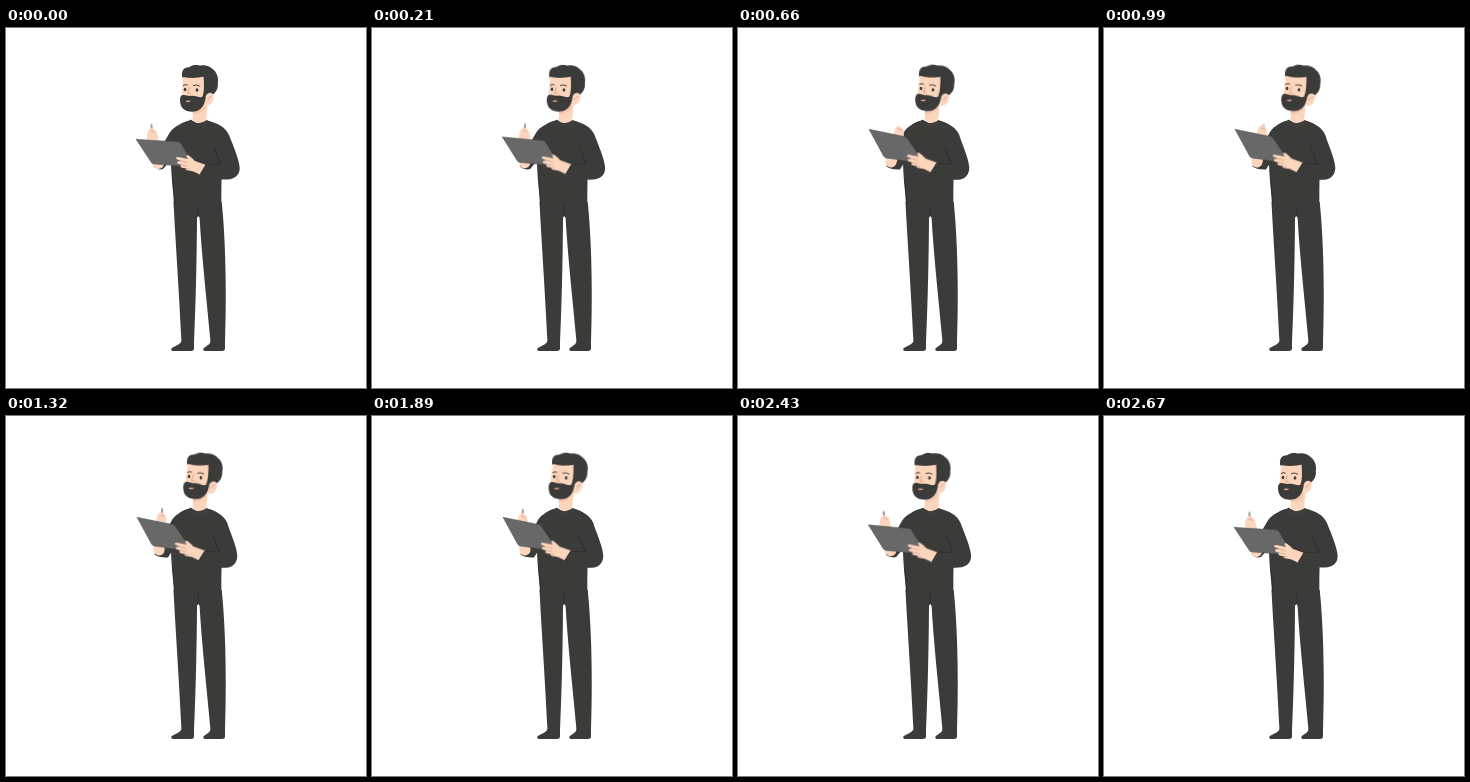
An HTML page that plays this animation: 360x360 px, repeating every 2700 ms.

```html
<!DOCTYPE html>
<html lang="en">
<head>
<meta charset="utf-8">
<title>Man taking notes</title>
<style>
html, body { margin: 0; width: 100%; height: 100%; overflow: hidden; background: #fff; }
svg { display: block; width: 100%; height: 100%; }
.dark { fill: #3b3b3a; }
.skin { fill: #fcd5bd; }
.line { fill: none; stroke: #292929; stroke-width: .7; stroke-linecap: round; }
.thin { fill: none; stroke: #c99279; stroke-width: .6; stroke-linecap: round; }

/* Each moving part eases from pose a to pose b and back. */
.morph { d: var(--a); animation: morph 2.7s ease-in-out infinite; }
@keyframes morph {
  0%, 100% { d: var(--a); }
  23%, 71% { d: var(--b); }
}
.board {
  --a: path("M130 111.3 L172 114 Q174 114 175 116 L187 136.5 Q187 138.5 184 138.5 L148 136 Q146 136 145 134 Z");
  --b: path("M131 101.3 L166.5 108.5 Q168.5 109 169.5 111 L184 132.5 Q184 134.5 181 134.5 L148 130 Q146.5 129.5 145.5 128 Z");
  fill: #686868; stroke: #585858; stroke-width: .5;
}
.far {
  --a: path("M186 92 C176 95 168 98 163.5 105 C158 114 150 129 147.5 138 Q151 142.5 157 141 L174 122 Z");
  --b: path("M186 92 C177 95 170 97.5 166 104 C162 112 151 131 148.5 138.5 Q153 142 162 141.5 L174 122 Z");
}
.near {
  --a: path("M200 92.5 C212 95 219.5 99 223 107 C226.500 116 233.5 132 233.7 140 C233.700 147 229 151 221 151.5 C212 152 202 149.5 193.5 146.5 L199.5 136.5 L213 136 L207 113 Z");
  --b: path("M200 92.5 C211 95 218 99.5 221.300 107 C224 116 231 131 231.3 140 C231 147 227 151.3 220 151.8 C211 152.3 201 148.500 192 145 L198 135.5 L212 136 L206 113 Z");
}
.crease {
  --a: path("M208 120 Q212 130 215 136 L202 136.5");
  --b: path("M207 120 Q211 130 213.5 136 L201 135.5");
}

.hold { animation: hold 2.7s ease-in-out infinite; }
@keyframes hold {
  0%, 100% { transform: none; }
  23%, 71% { transform: translate(-1.3px, -2.4px); }
}

.head { transform-origin: 195px 90px; animation: head 2.7s ease-in-out infinite; }
@keyframes head {
  0%, 100% { transform: none; }
  23%, 57% { transform: translate(2px, 0) rotate(4deg); }
}

.fist { animation: fist 2.7s linear infinite; }
@keyframes fist {
  0%, 100% { transform: translate(146px, 106px); }
  15.56% { transform: translate(159px, 105px); }
  24.44% { transform: translate(161px, 104px); }
  48.89% { transform: translate(155.5px, 102px); }
  70% { transform: translate(150.5px, 103px); }
  81.11% { transform: translate(147.5px, 104px); }
}
.pencil { animation: pencil 2.7s linear infinite; }
@keyframes pencil {
  0%, 100% { transform: rotate(-4deg); }
  15.56% { transform: rotate(12deg); }
  24.44% { transform: translateY(7px) rotate(12deg); }
  48.89% { transform: rotate(5deg); }
  70% { transform: rotate(2deg); }
  81.11% { transform: rotate(-10deg); }
}
.wrist {
  fill: none; stroke: #fcd5bd; stroke-width: 11; stroke-linecap: round;
  animation: wrist 2.7s linear infinite;
}
@keyframes wrist {
  0%, 100% { d: path("M152.5 135.5 L146.5 109"); }
  15.56% { d: path("M153 134 L158.5 109"); }
  24.44% { d: path("M153 134 L160.5 109"); }
  48.89% { d: path("M153 134 L155 107"); }
  70% { d: path("M153 134 L150.5 107"); }
  81.11% { d: path("M153 134 L147.5 108"); }
}
</style>
</head>
<body>
<svg viewBox="0 0 360 360">
  <!-- legs and shoes -->
  <path class="dark" d="M167.500 174 C169 205 173 262 175.500 314 L188 314 C190 270 190.800 225 191 190 Q192.300 186.500 193.600 190 C195.500 225 200.500 270 204.500 314 L219 314 C220.800 265 219.500 210 215.700 174 Z"/>
  <path class="dark" d="M175.500 313 C174.500 317 166.500 318.500 165.200 321 Q165 323 168 323 L185 323 Q187.800 323 188 321 L188 313 Z"/>
  <path class="dark" d="M204.500 313 C204.500 317 198.500 318.500 197.300 321 Q197 323 200 323 L216 323 Q218.800 323 219 321 L219 313 Z"/>

  <path class="dark morph far"/>
  <path class="wrist"/>

  <path class="dark" d="M185 92 Q192 97 201 92.500 C211 95 219 100 218 116 C216.500 134 214.800 150 215.700 183 Q191 191 168.300 183 C168 165 164 145 165 120 C165.500 104 170 95.500 185 92 Z"/>
  <path class="line" d="M192.300 187 V178 M166.500 151 Q168.500 165 168.800 177"/>

  <!-- writing hand -->
  <g class="fist">
    <path class="pencil" d="M-.8 0 L-.8 -8.500 L0 -11 L.8 -8.500 L.8 0 Z" fill="#858585"/>
    <path class="skin" d="M-5 5 C-5.500 0 -4 -4.500 -1.500 -5.800 Q1 -6 2 -4.500 Q4.800 -3.500 4.800 0 L4.500 6 Z"/>
    <path class="thin" d="M-1 -3 Q1.500 -3.500 3 -1"/>
  </g>
  <path class="morph board"/>

  <!-- holding hand and sleeve -->
  <g class="hold">
    <path class="skin" d="M200 137 L189 133 C186 130 183 127 181 127 Q179.500 128 182 131 L172 129 Q169 129 170.500 131 L175 133 L171.500 133.500 Q170 135 172.500 136 L176 137 Q173 138 175.500 139.500 L180 140.500 Q179 142 182 142.500 C187 143 189 144 194.500 147 Z"/>
    <path class="thin" d="M175 133 L181 134.500 M176 137 L181 138 M180 140.500 L183 141"/>
  </g>
  <path class="dark morph near"/>
  <path class="line morph crease"/>

  <!-- neck and collar -->
  <path class="skin" d="M187 78 L186.500 92.500 Q192 98 200 93 L202 74 Z"/>
  <path d="M187 83 Q195 83 200 77 L199.500 81 Q194 86.500 187 86 Z" fill="#f4c5aa"/>
  <path class="dark" d="M184.500 91.500 Q192 98.500 201 92 L202.500 94 Q192 102 183 94 Z"/>
  <path d="M183.500 94.200 Q192 101.500 202 94.300" fill="none" stroke="#4d4d4d" stroke-width=".6"/>

  <g class="head">
    <path class="dark" d="M176.500 50 C174.500 43 178 39 183 39.200 C187 36 192 36.800 194.500 37.600 C199 36.500 204 38.500 206.500 41 C211 44 212.800 50 211.800 55 C212.500 60 210 64 207.500 66 L203 72 L196 70 L180 50 Z"/>
    <path class="skin" d="M177 49 Q188 51 198.500 48.500 L200.500 66 L197 77 L179 78 Q175.800 70 176 64 Z"/>
    <path class="skin" d="M199.500 69 C201 64 206.500 63.500 207.500 67.500 C208.500 72 205 78 199 77.500 Z"/>
    <path class="thin" d="M202 72 Q203 68 205.500 68"/>
    <path class="dark" d="M197.500 48 L202.500 49 L201.500 64 L199.500 69 C199.500 75 196.500 81 191 83 C184 85 176 83 174.500 76 C173.500 72 174 68 176 67.300 C179 66 182 68.500 185 67.800 C190 67 194 70.500 196.500 68.500 C198.500 64 198 54 197.500 48 Z"/>
    <path d="M177.300 57.400 Q179 56 181.200 57 M187.500 57.500 Q190.500 56 193.500 58" fill="none" stroke="#3b3b3a" stroke-width="1" stroke-linecap="round"/>
    <ellipse cx="179" cy="61.500" rx="1.300" ry="1.700" class="dark"/>
    <ellipse cx="191" cy="62" rx="1.400" ry="1.700" class="dark"/>
    <path d="M183.500 60 Q181.800 63 181.800 65 Q182.500 66 184 65.500" fill="none" stroke="#d68f73" stroke-width=".8" stroke-linecap="round"/>
    <path d="M179.300 73 Q182 72 185 72.800 Q182 75.800 179.300 73 Z" fill="#e5a28f"/>
  </g>
</svg>
</body>
</html>
```
